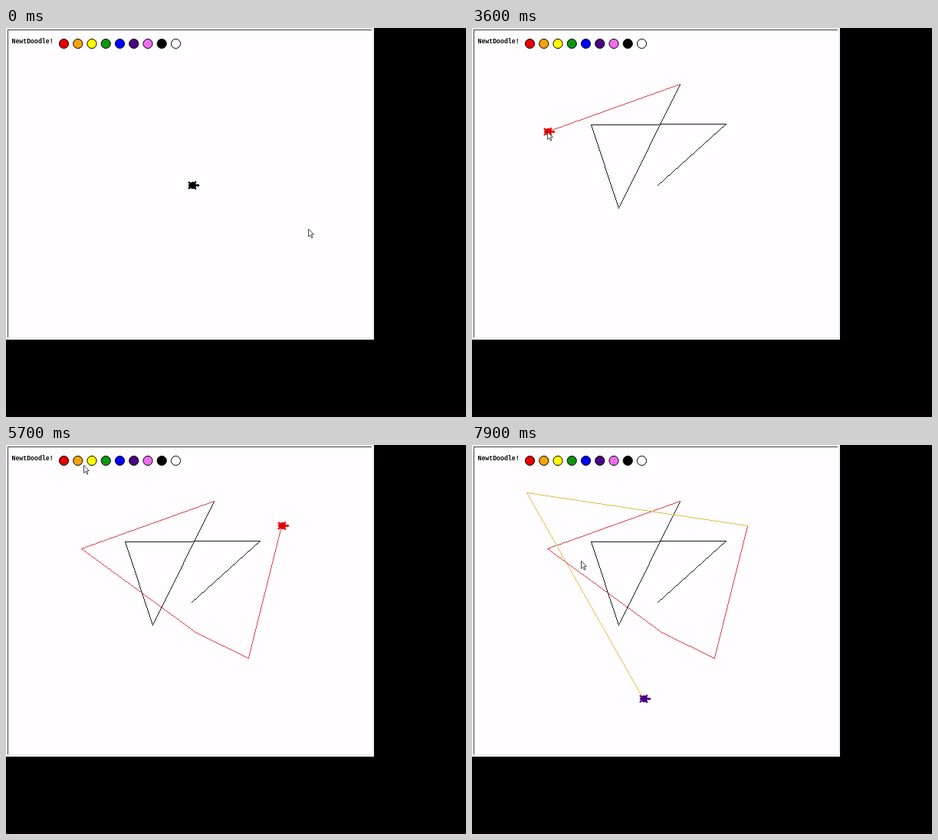
Animation, 600 px wide and 508 px high, one loop 8 s. Source, as an HTML page:

```html
<!DOCTYPE html>
<html lang="en">
<head>
<meta charset="utf-8">
<title>Turtle drawing</title>
<style>
  html, body { margin: 0; width: 100%; height: 100%; overflow: hidden; background: #000; }
  svg { display: block; width: 100%; height: 100%; }
  text { font: bold 8.2px "Liberation Mono", monospace; }
</style>
</head>
<body>
<svg viewBox="0 0 600 508">
  <rect width="600" height="508"/>
  <rect y="505" width="600" height="3" fill="#0a0004"/>
  <g shape-rendering="crispEdges">
    <rect width="480" height="407" fill="#f3eff3"/>
    <rect x="2" y="2" width="476" height="402" fill="#fffdff"/>
    <path d="M2.5 404V2.5H477" fill="none" stroke="#444"/>
  </g>
  <text x="7.5" y="20">NewtDoodle!</text>
  <g id="palette" stroke="#000"></g>
  <g id="trail" shape-rendering="crispEdges"></g>
  <path id="turtle" stroke-linejoin="round"/>
  <path id="cursor" d="M.5 .5V10.5L2.8 8.4L4.5 12.2L6 11.5L4.3 7.7H7.4Z" fill="#fff" stroke="#333" stroke-width=".9"/>
</svg>
<script>
const LOOP = 8000, STEP = 100;
const LAG = 300;     // from a click to the turtle's response
const TRAVEL = 200;  // longest time the pointer takes between stops
const RED = 0, ORANGE = 1, INDIGO = 5, BLACK = 7;
const colors = ['#e60000', '#f5a30a', '#ff0', '#0c960c', '#00f', '#4b0082', '#ee6cee', '#000', '#fffdff'];
const lineColors = { [RED]: '#d84450', [ORANGE]: '#e6bc50', [BLACK]: '#1c1c1c' };
const swatchX = i => 75.5 + 18.25 * i;
const [palette, trail, turtle, cursor] =
  ['palette', 'trail', 'turtle', 'cursor'].map(id => document.getElementById(id));

function add(parent, tag, attributes) {
  const node = document.createElementNS('http://www.w3.org/2000/svg', tag);
  for (const name in attributes) node.setAttribute(name, attributes[name]);
  return parent.appendChild(node);
}

colors.forEach((fill, i) => add(palette, 'circle', { cx: swatchX(i), cy: 20.5, r: 6.1, fill }));

// One side of the turtle from nose to tail, then its mirror image
const side = [[16, 0], [14, 2], [10, 1], [7, 4], [9, 7], [8, 9], [5, 6], [1, 7],
  [-3, 5], [-6, 8], [-8, 6], [-5, 4], [-7, 0]];
const mirrored = side.map(([x, y]) => [x, -y]).reverse();
turtle.setAttribute('d', 'M' + [...side, ...mirrored].map(p => p.map(v => v * .6)).join('L') + 'Z');

// One square per pixel keeps the line free of smoothing.
function pixelLine(a, b) {
  const dx = b.x - a.x, dy = b.y - a.y, n = Math.max(Math.abs(dx), Math.abs(dy));
  let d = '';
  for (let i = 0; i <= n; i++)
    d += `M${Math.round(a.x + dx * i / n)} ${Math.round(a.y + dy * i / n)}h1v1h-1z`;
  return d;
}

const stops = [{ time: 0, x: 394, y: 262 }];
const states = [{ time: 0, x: 242, y: 205, color: BLACK }];
const segments = [];

function hover(time, x, y) {
  stops.push({ time, x, y });
}
function pick(time, color) {
  hover(time, swatchX(color), 20);
  states.push({ ...states.at(-1), time: time + LAG, color });
}
function drawTo(click, x, y) {
  hover(click, x, y);
  const from = states.at(-1), to = { ...from, time: click + LAG, x, y };
  states.push(to);
  segments.push({ time: to.time, node: add(trail, 'path', { d: pixelLine(from, to), fill: lineColors[to.color] }) });
}

hover(300, 488, 192);
hover(500, 488, 192);
drawTo(600, 331, 125);
hover(900, 414, 135);
drawTo(1200, 155, 126);
hover(1300, 194, 156);
drawTo(1800, 191, 235);
drawTo(2300, 271, 73);
hover(2700, 230, 39);
pick(2900, RED);
drawTo(3300, 98, 135);
drawTo(3900, 248, 245);
drawTo(4200, 316, 278);
hover(4300, 314, 306);
hover(4500, 395, 346);
hover(4900, 420, 200);
drawTo(5200, 359, 105);
hover(5700, 101, 26);
pick(5800, ORANGE);
drawTo(6200, 71, 62);
hover(6600, 284, 397);
hover(6700, 270, 430);
drawTo(7000, 223, 331);
pick(7400, INDIGO);
hover(7900, 142, 151);

const latest = (list, time) => list.findLastIndex(item => item.time <= time);

function pointerAt(time) {
  const i = latest(stops, time), from = stops[i], to = stops[i + 1] || from;
  const start = Math.max(from.time, to.time - TRAVEL);
  const f = time > start ? (time - start) / (to.time - start) : 0;
  return [from.x + (to.x - from.x) * f, from.y + (to.y - from.y) * f].map(Math.round);
}

function place(node, x, y) {
  node.setAttribute('transform', `translate(${x} ${y})`);
}

function draw() {
  const time = Math.floor(performance.now() % LOOP / STEP) * STEP;
  for (const segment of segments)
    segment.node.setAttribute('visibility', time >= segment.time ? 'visible' : 'hidden');
  const { x, y, color } = states[latest(states, time)];
  turtle.setAttribute('fill', colors[color]);
  turtle.setAttribute('stroke', colors[color]);
  place(turtle, x + .5, y + .5);
  place(cursor, ...pointerAt(time));
  requestAnimationFrame(draw);
}
draw();
</script>
</body>
</html>
```
